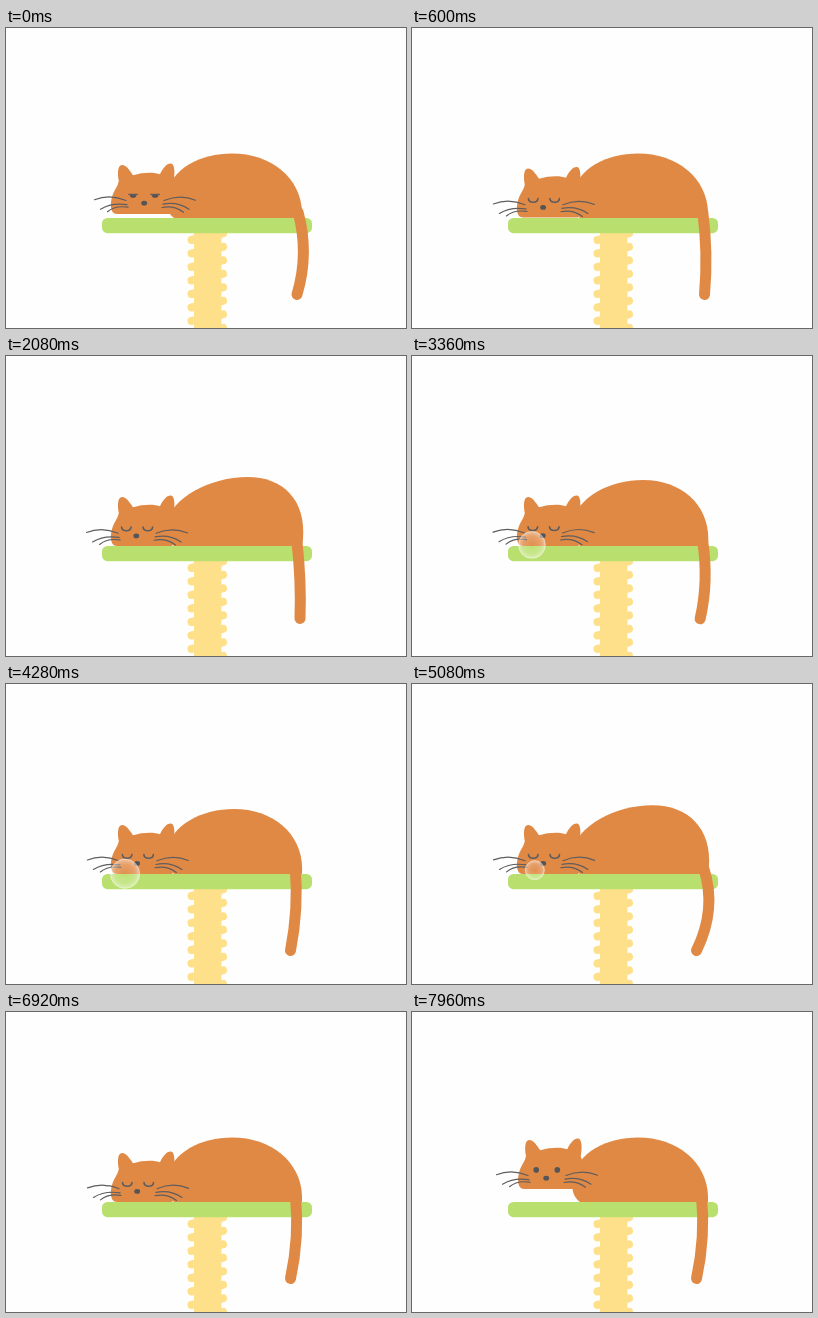
An HTML page for the animation above (8 s loop, 400x300 px).

```html
<!DOCTYPE html>
<html lang="en">
<head>
<meta charset="utf-8">
<title>Sleeping cat</title>
<style>
  html, body { margin: 0; width: 100%; height: 100%; overflow: hidden; background: #fefefe; }
  svg { display: block; width: 100vw; height: 100vh; }
  .fur { fill: #e08945; }
  .line { fill: none; stroke: #5f5d5e; stroke-width: 1.2; stroke-linecap: round; }
  .dark { fill: #555557; }
</style>
</head>
<body>
<svg viewBox="0 0 400 300">
  <defs>
    <radialGradient id="film">
      <stop offset="0" stop-color="#fff" stop-opacity=".05"/>
      <stop offset=".65" stop-color="#fff" stop-opacity=".2"/>
      <stop offset="1" stop-color="#fff" stop-opacity=".48"/>
    </radialGradient>
  </defs>

  <g fill="#fee08a" stroke="#fee08a">
    <rect x="188" y="200" width="27.500" height="100" stroke="none"/>
    <path id="rope" stroke-width="8" stroke-linecap="round"/>
  </g>
  <rect x="96" y="190" width="210" height="15.200" rx="5.500" fill="#b9e06e"/>

  <path id="tail" fill="none" stroke="#e08945" stroke-width="11" stroke-linecap="round"/>
  <path id="body" class="fur"/>
  <path id="head" class="fur" d="M111 190C104 190 103.500 179 107 170C109 165 112 162 112.800 157
    C111.300 150 111.500 141 116 141C120.500 141 124 147 127 151.200C137 148 149 148 154 150.200
    C157 144 161 139 165 139.500C169 140 169 150 167.500 157L174 178L166 190Z"/>

  <g id="face">
    <ellipse class="dark" cx="130.200" cy="180" rx="2.900" ry="2.400"/>
    <g class="line">
      <path d="M80.500 176.500Q96 170.500 112 177.300M86.500 186Q98 179 113 181.500M93.500 188.500Q101 182 114 184"/>
      <path d="M150 177.300Q166 170.500 181.500 177M149 181Q163 178 175 186M148 184.300Q160 182 169.500 189"/>
    </g>
    <path id="closed" class="line" style="stroke-width:1.6"
      d="M115.500 171.200C116 176 124.500 176 125 171.200M137 171.200C137.500 176 146 176 146.500 171.200"/>
    <g id="drowsy" class="dark">
      <path d="M115.700 171.200a3.400 3.400 0 0 0 6.800 0zM137.700 171.200a3.400 3.400 0 0 0 6.800 0z"/>
      <path class="line" d="M114.800 171.200h8.600M136.800 171.200h8.600"/>
    </g>
    <g id="awake" class="dark">
      <circle cx="120.200" cy="171.700" r="2.800"/>
      <circle cx="141.300" cy="171.700" r="2.800"/>
    </g>
  </g>

  <circle id="bubble" fill="url(#film)" stroke="#fff" stroke-opacity=".4" stroke-width="1"/>
</svg>

<script>
const LOOP = 8000;
const INHALE_PEAK = 2380, BREATH = 3100;
const BREATH_START = INHALE_PEAK - BREATH / 2, BREATH_END = BREATH_START + 2 * BREATH;
const BUBBLE_START = 2450, WAKE = 6920;
const TAIL_SWING = 2680;

const el = Object.fromEntries([...document.querySelectorAll('[id]')].map(e => [e.id, e]));

// Smooth step from 0 to 1 between two times.
function ease(t, from, to) {
  const u = Math.min(1, Math.max(0, (t - from) / (to - from)));
  return u * u * (3 - 2 * u);
}

const wave = phase => Math.cos(2 * Math.PI * phase);
const move = (node, x, y) => node.setAttribute('transform', `translate(${x} ${y})`);
const show = (node, on) => node.setAttribute('visibility', on ? 'visible' : 'hidden');

function drawBody(air) {
  const top = 125.5 - 5 * air;
  el.body.setAttribute('d', `M168 190C161 185 160 178 160 168
    C165 ${140 + 2 * air} ${195 + 10 * air} ${top} ${226 + 17 * air} ${top}
    C${265 + 13 * air} ${top} ${295 + 6 * air} ${150 - 7 * air} ${296 + air} 184L296 190Z`);
}

function drawTail(t) {
  const rest = ease(t, 6200, 7000);
  const swing = wave(t / TAIL_SWING) * (1 - rest) - 0.7 * rest;
  const root = 290.5 + 1.5 * swing;
  const bend = 293.2 + 4.2 * swing;
  const tip = 291 + 3 * ease(t, 0, 1200) - 9.5 * ease(t, 2100, 4280);
  const end = 266.5 - 4 * (ease(t, 1280, 2100) - ease(t, 3200, 4280));
  // Control point chosen so that the curve passes through the bend halfway down.
  const control = 2 * bend - (root + tip) / 2;
  el.tail.setAttribute('d', `M${root} 184Q${control} 225 ${tip} ${end}`);
}

function drawHead(t) {
  const nod = 1 - ease(t, 0, 760);
  const drift = ease(t, 1500, 5000);
  const lift = ease(t, WAKE, 7400);
  move(el.head, 1.2 * lift, -4 * nod - 13 * lift);
  move(el.face, 8 * nod + drift + 3 * lift, -4.8 * nod - 0.6 * drift - 13.2 * lift);

  const drowsy = t < 420, awake = t >= WAKE + 40;
  show(el.drowsy, drowsy);
  show(el.awake, awake);
  show(el.closed, !drowsy && !awake);
}

// The bubble hangs from the nose and shrinks while the cat breathes in.
function drawBubble(t, air) {
  const r = (15.5 - 7 * air) * ease(t, BUBBLE_START, 3200);
  el.bubble.setAttribute('r', r);
  el.bubble.setAttribute('cx', 130 - 0.75 * r);
  el.bubble.setAttribute('cy', 179.5 + 0.7 * r);
  show(el.bubble, t > BUBBLE_START && t < WAKE);
}

function draw(t) {
  const breathing = t > BREATH_START && t < BREATH_END;
  const air = breathing ? (1 + wave((t - INHALE_PEAK) / BREATH)) / 2 : 0;
  drawBody(air);
  drawTail(t);
  drawHead(t);
  drawBubble(t, air);
}

el.rope.setAttribute('d',
  Array.from({ length: 8 }, (_, i) => `M185.5 ${212 + 13.5 * i}L217 ${205.3 + 13.5 * i}`).join(''));

const start = performance.now();
function tick() {
  draw((performance.now() - start) % LOOP);
  requestAnimationFrame(tick);
}
tick();
</script>
</body>
</html>
```
